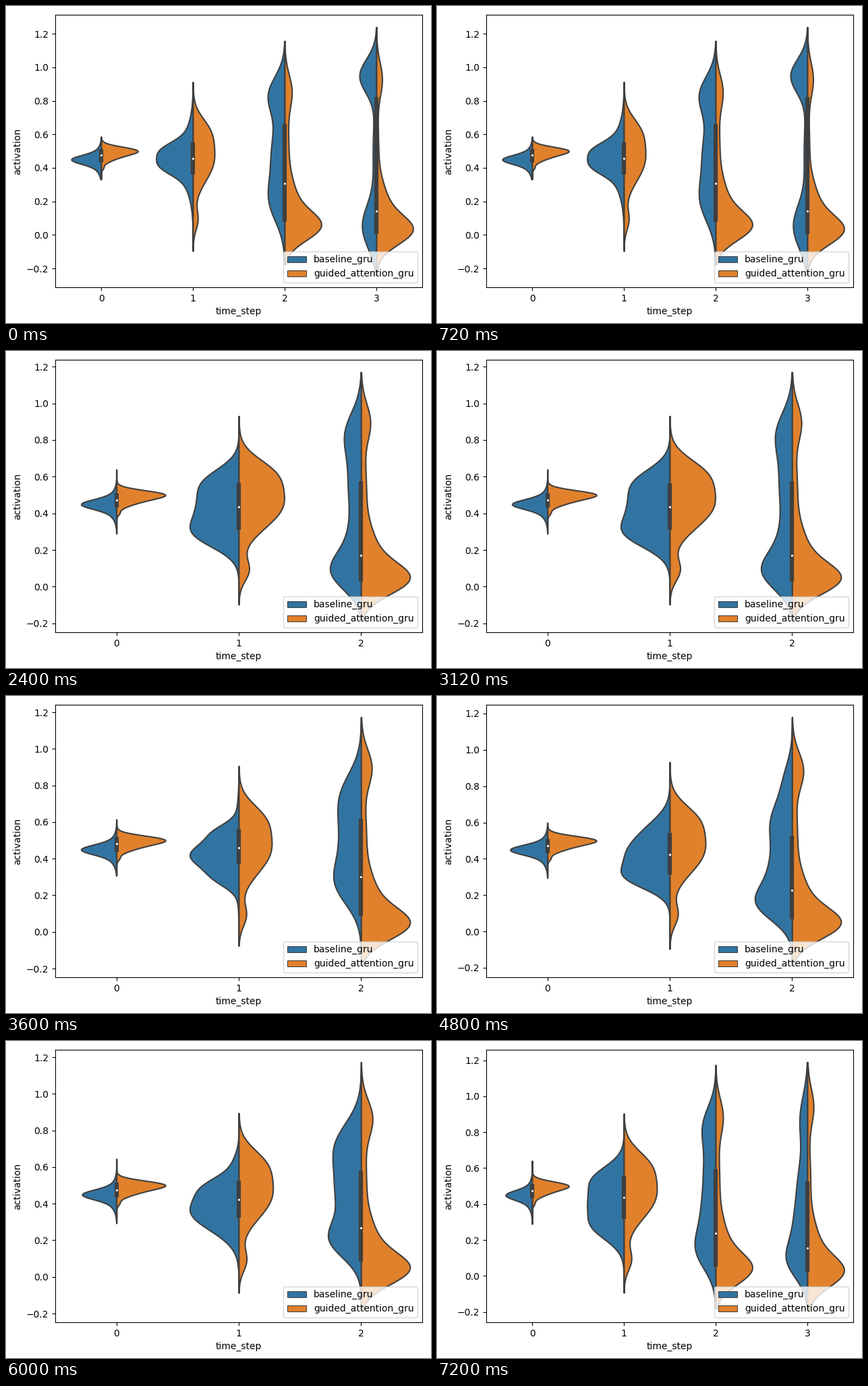
A matplotlib script that plays this animation: 630 by 470 pixels, repeating every 8000 ms.

```python
import numpy as np
import matplotlib.pyplot as plt
from matplotlib.animation import FuncAnimation
from matplotlib.patches import Patch

plt.rcParams["font.family"] = "DejaVu Sans"

W, H = 630, 470
LEFT, RIGHT, TOP, BOTTOM = 73, 617, 13, 417   # plot area in pixels
BLUE, ORANGE, GRAY = "#3274a1", "#e1812c", "#3f3f3f"
LINE = 1.5

fig = plt.figure(figsize=(W / 100, H / 100), dpi=100, facecolor="white")
ax = fig.add_axes([LEFT / W, 1 - BOTTOM / H, (RIGHT - LEFT) / W, (BOTTOM - TOP) / H])


def axis(count, low, high):
    """Empty plot with a 5 % margin around the data range."""
    ax.clear()
    margin = 0.05 * (high - low)
    ax.set_xlim(-0.5, count - 0.5)
    ax.set_ylim(low - margin, high + margin)
    ax.set_xticks(range(count), [str(n) for n in range(count)])
    ax.set_xlabel("time_step")
    ax.set_ylabel("activation")
    ax.legend(handles=[Patch(fc=c, ec=GRAY, lw=LINE / 2, label=name) for c, name in
                       ((BLUE, "baseline_gru"), (ORANGE, "guided_attention_gru"))],
              loc="lower right")


def half(pos, side, color, span, peak, bumps):
    """Fill one side with a sum of Gaussians (mean, spread, weight)."""
    y = np.linspace(*span, 200)
    density = sum(k * np.exp(-((y - mean) / s) ** 2 / 2) for mean, s, k in bumps)
    ax.fill_betweenx(y, pos, pos + side * 0.4 * peak * density / density.max(),
                     facecolor=color, edgecolor=GRAY, linewidth=LINE)


def violin(pos, span, box, left, right):
    """Each side is a pair of its peak (1 is the full width) and its bumps."""
    half(pos, -1, BLUE, span, *left)
    half(pos, 1, ORANGE, span, *right)
    low, median, high = box
    ax.plot([pos, pos], [low, high], color=GRAY, lw=3 * LINE, solid_capstyle="butt")
    ax.scatter(pos, median, s=(2 * LINE) ** 2, color="white", edgecolor=GRAY,
               linewidth=LINE / 2, zorder=3)


def start(span, median, peak):
    """Step 0: both models sit close to the middle."""
    violin(0, span, (median - 0.042, median, median + 0.038),
           (peak, [(0.45, 0.025, 0.5), (0.445, 0.05, 0.22)]),
           (1, [(0.506, 0.022, 0.7), (0.473, 0.03, 0.45), (0.4, 0.012, 0.04)]))


def guided_early(peak):
    return peak, [(0.45, 0.13, 0.55), (0.63, 0.08, 0.25), (0.09, 0.06, 0.12)]


def guided_late(low, high, weight, bridge=0.1):
    """A main mode near zero, a small one near one and a bridge between."""
    return 1, [(low, 0.085, 0.85), (low + 0.15, 0.13, 0.3),
               (0.55, 0.17, bridge), (high, 0.1, weight)]


def scene_a():
    axis(4, -0.238, 1.239)
    start((0.332, 0.585), 0.476, 0.81)
    violin(1, (-0.095, 0.911), (0.36, 0.456, 0.553),
           (1, [(0.505, 0.05, 0.5), (0.41, 0.05, 0.5), (0.45, 0.14, 0.42)]),
           guided_early(0.59))
    violin(2, (-0.175, 1.156), (0.078, 0.308, 0.661),
           (0.46, [(0.2, 0.13, 0.85), (0.5, 0.17, 0.8), (0.84, 0.11, 0.95)]),
           guided_late(0.05, 0.86, 0.18))
    violin(3, (-0.238, 1.239), (0.006, 0.143, 0.822),
           (0.46, [(0.05, 0.13, 0.8), (0.5, 0.22, 0.2), (0.95, 0.1, 0.95)]),
           guided_late(0.025, 0.93, 0.155, 0.05))


def scene_b():
    axis(4, -0.24, 1.242)
    start((0.295, 0.598), 0.473, 0.77)
    violin(1, (-0.096, 0.945), (0.3, 0.44, 0.57),
           (1, [(0.25, 0.09, 0.82), (0.43, 0.09, 0.65), (0.6, 0.1, 0.6)]),
           guided_early(0.97))
    violin(2, (-0.21, 1.21), (0.009, 0.126, 0.687),
           (0.69, [(0.05, 0.11, 0.9), (0.22, 0.1, 0.35), (0.5, 0.2, 0.2),
                   (0.88, 0.095, 0.53)]),
           guided_late(0.035, 0.9, 0.23))
    violin(3, (-0.24, 1.242), (-0.007, 0.037, 0.541),
           (0.66, [(0.02, 0.1, 0.85), (0.17, 0.11, 0.35), (0.5, 0.22, 0.1),
                   (0.95, 0.1, 0.44)]),
           guided_late(0.015, 0.945, 0.165, 0.07))


def scene_c():
    axis(3, -0.181, 1.17)
    start((0.29, 0.638), 0.473, 0.72)
    violin(1, (-0.097, 0.93), (0.311, 0.436, 0.565),
           (1, [(0.29, 0.08, 0.85), (0.43, 0.08, 0.6), (0.57, 0.08, 0.66)]),
           guided_early(0.93))
    violin(2, (-0.181, 1.17), (0.028, 0.171, 0.576),
           (0.634, [(0.08, 0.1, 0.85), (0.25, 0.12, 0.3), (0.55, 0.16, 0.38),
                    (0.84, 0.12, 0.45)]),
           guided_late(0.04, 0.9, 0.18))


def scene_d():
    axis(3, -0.18, 1.173)
    start((0.308, 0.614), 0.481, 0.72)
    violin(1, (-0.075, 0.905), (0.371, 0.459, 0.563),
           (1, [(0.42, 0.072, 0.85), (0.55, 0.045, 0.28), (0.29, 0.05, 0.3),
                (0.45, 0.15, 0.12)]),
           guided_early(0.675))
    violin(2, (-0.18, 1.173), (0.087, 0.301, 0.618),
           (0.565, [(0.26, 0.12, 0.75), (0.5, 0.15, 0.6), (0.75, 0.13, 0.6)]),
           guided_late(0.04, 0.9, 0.21))


def scene_e():
    axis(3, -0.184, 1.18)
    start((0.295, 0.598), 0.472, 0.76)
    violin(1, (-0.096, 0.932), (0.312, 0.424, 0.543),
           (1, [(0.3, 0.068, 0.78), (0.42, 0.07, 0.5), (0.53, 0.09, 0.5)]),
           guided_early(0.73))
    violin(2, (-0.184, 1.18), (0.067, 0.227, 0.528),
           (0.76, [(0.15, 0.095, 0.8), (0.33, 0.12, 0.5), (0.6, 0.13, 0.55),
                   (0.85, 0.1, 0.16)]),
           guided_late(0.04, 0.89, 0.22))


def scene_f():
    axis(3, -0.18, 1.173)
    start((0.294, 0.644), 0.476, 0.7)
    violin(1, (-0.086, 0.894), (0.323, 0.423, 0.526),
           (1, [(0.36, 0.105, 0.9), (0.5, 0.055, 0.3), (0.62, 0.06, 0.08)]),
           guided_early(0.7))
    violin(2, (-0.18, 1.173), (0.084, 0.268, 0.581),
           (0.675, [(0.2, 0.1, 0.8), (0.45, 0.14, 0.65), (0.72, 0.13, 0.68)]),
           guided_late(0.04, 0.87, 0.22))


def scene_g():
    axis(4, -0.189, 1.19)
    start((0.29, 0.64), 0.474, 0.72)
    violin(1, (-0.093, 0.903), (0.316, 0.437, 0.557),
           (1, [(0.29, 0.085, 0.78), (0.41, 0.06, 0.35), (0.53, 0.08, 0.76)]),
           guided_early(0.9))
    violin(2, (-0.18, 1.173), (0.05, 0.237, 0.595),
           (0.57, [(0.14, 0.11, 0.8), (0.35, 0.13, 0.55), (0.6, 0.13, 0.45),
                   (0.84, 0.11, 0.55)]),
           guided_late(0.035, 0.89, 0.19))
    violin(3, (-0.189, 1.19), (0.02, 0.155, 0.527),
           (0.59, [(0.08, 0.1, 0.75), (0.26, 0.13, 0.5), (0.52, 0.15, 0.4),
                   (0.88, 0.13, 0.33)]),
           guided_late(0.02, 0.945, 0.165, 0.08))


SCENES = (scene_a, scene_b, scene_c, scene_d, scene_e, scene_f, scene_g)


def draw(i):
    SCENES[i // 3]()   # three ticks of 400 ms each; the last scene gets two
    return []


anim = FuncAnimation(fig, draw, frames=20, interval=400, repeat=True,
                     repeat_delay=0, blit=False)
plt.show()
```
